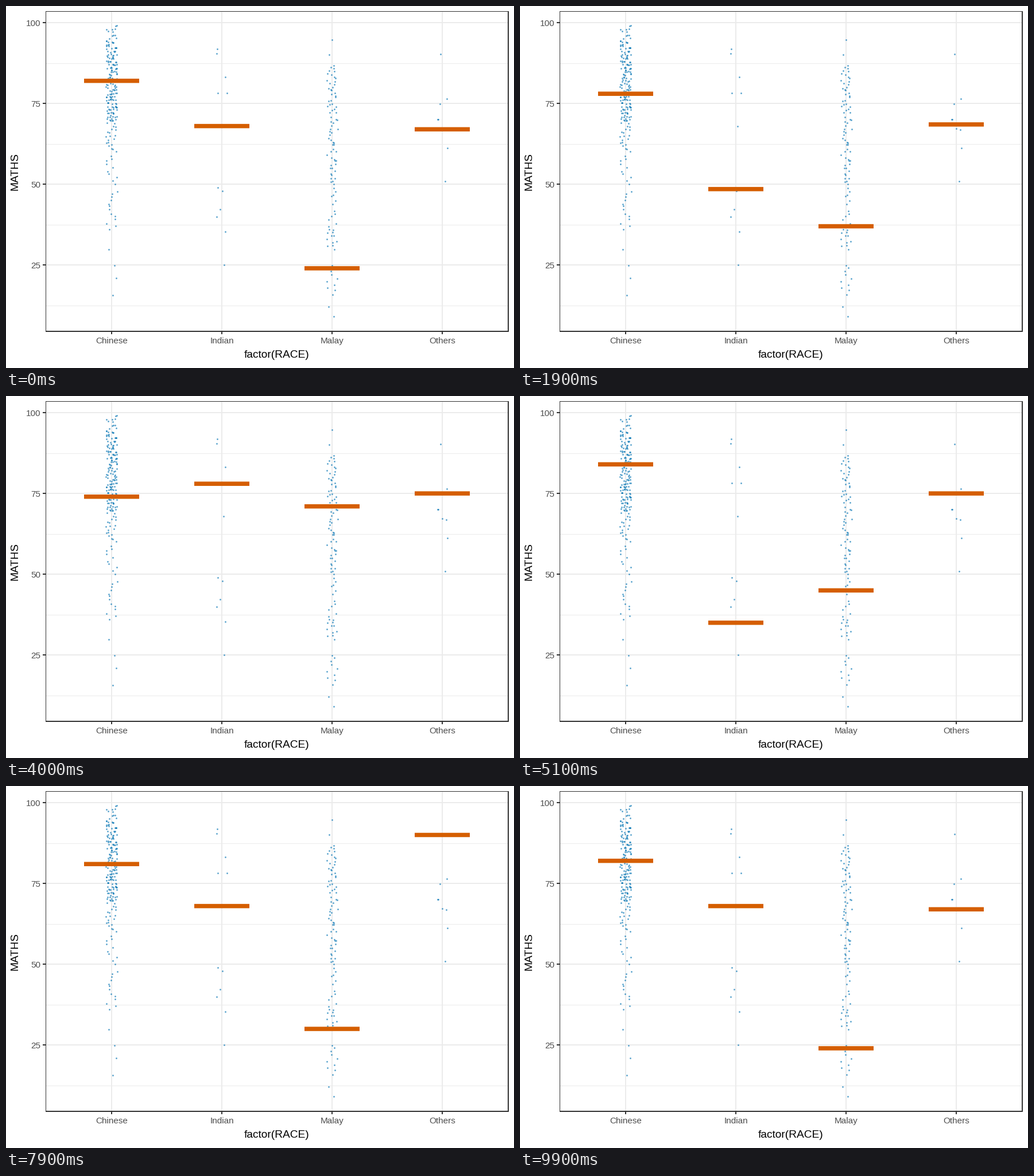
Animation, 885 px wide and 632 px high, one loop 10000 ms. Source, as a matplotlib script:

```python
import numpy as np
import matplotlib.pyplot as plt
from matplotlib.animation import FuncAnimation
from matplotlib.patches import Rectangle

W, H, DPI = 885, 632, 100
PX = 72 / DPI                       # points per pixel
FRAMES, INTERVAL = 100, 100
LEFT, TOP, RIGHT, BOTTOM = 69, 9, 876, 569
GROUPS = ["Chinese", "Indian", "Malay", "Others"]
BLUE, ORANGE = "#0072B2", "#D55E00"
GRID, DARK, GREY = "#EBEBEB", "#333333", "#4D4D4D"
BAR_W, BAR_H = 96, 7.5

# Sampled score of each group, state by state.
STATES = np.array([
    [82, 76, 67, 63, 83, 73, 78, 95, 91, 82, 74, 91, 80,
     84, 78, 89, 79, 66, 68, 72, 81, 76, 89, 78, 80],
    [68, 25, 78, 40, 48, 49, 40, 78, 40, 68, 78, 42, 68,
     35, 42, 68, 92, 25, 48, 49, 68, 25, 78, 68, 25],
    [24, 62, 87, 18, 58, 16, 61, 56, 60, 63, 71, 58, 58,
     45, 60, 58, 25, 32, 24, 58, 30, 58, 70, 63, 58],
    [67, 90, 67, 51, 70, 67, 75, 70, 75, 67, 75, 70, 67,
     75, 67, 70, 76, 70, 67, 76, 90, 70, 70, 67, 90]], float).T

# Small groups: pixel offsets from the group centre, and scores.
SMALL = {
    1: ([-8, -9, 6, -7, 9, 3, -7, 1, -3, -9, 6, 4],
        [91.9, 90.4, 83.2, 78.3, 78.2, 68, 48.9, 47.9, 42.3, 39.9, 35.3, 25]),
    3: ([-3, 8, -4, -8, -7, 0, 7, 9, 5],
        [90.2, 76.4, 74.9, 70.1, 70.1, 67.3, 66.9, 61.2, 51]),
}

# Large groups: ranks and the scores reached there.
LARGE = {
    0: ([0, 3, 4, 28, 47, 78, 112, 136, 169, 196, 208],
        [16, 30, 36, 61, 69.5, 74.5, 79.5, 84.5, 89.5, 94.5, 99]),
    2: ([0, 2, 11, 12, 24, 36, 51, 61, 78, 89, 103, 104, 105],
        [9, 16, 25, 30, 37, 50, 58.5, 64.5, 74.5, 79.5, 87, 90, 95]),
}


def x_of(group):
    return 184 + 192 * group


def y_of(score):
    return 29.05 + (100 - score) * 5.643


def rect(x0, y0, x1, y1, color, z, snap=True):
    patch = Rectangle((x0, y0), x1 - x0, y1 - y0, fc=color, lw=0, zorder=z,
                      snap=snap)
    return ax.add_patch(patch)


def label(x, y, text, size, color, **kw):
    ax.text(x, y, text, fontsize=size * PX, color=color,
            family="Liberation Sans", **kw)


def scatter_points():
    rng = np.random.default_rng(7)
    points = []
    for g, (dx, scores) in SMALL.items():
        points += zip(x_of(g) + np.array(dx), y_of(np.array(scores)))
    for g, (ranks, scores) in LARGE.items():
        n = ranks[-1] + 1
        whole = np.round(np.interp(np.arange(n), ranks, scores))
        dx = rng.uniform(-9.6, 9.6, n)
        points += zip(x_of(g) + dx, y_of(whole + rng.uniform(-0.3, 0.3, n)))
    return np.array(points)


def draw_panel():
    for v in (12.5, 37.5, 62.5, 87.5):
        y = round(y_of(v))
        rect(LEFT, y, RIGHT, y + 1, GRID, 1)
    for v in (25, 50, 75, 100):
        y = round(y_of(v))
        rect(LEFT, y - 1, RIGHT, y + 1, GRID, 1)
        rect(64, y - 1, LEFT, y + 1, DARK, 1)
        label(60.3, y + 6, str(v), 15.2, GREY, ha="right", va="baseline")
    for g, name in enumerate(GROUPS):
        x = x_of(g)
        rect(x - 1, TOP, x + 1, BOTTOM, GRID, 1)
        rect(x - 1, BOTTOM, x + 1, 573, DARK, 1)
        label(x, 589, name, 15.2, GREY, ha="center", va="baseline")
    rect(LEFT, TOP, LEFT + 1, BOTTOM, DARK, 5)
    rect(LEFT, TOP, RIGHT, TOP + 1, DARK, 5)
    rect(RIGHT - 2, TOP, RIGHT, BOTTOM, DARK, 5)
    rect(LEFT, BOTTOM - 2, RIGHT, BOTTOM, DARK, 5)
    label(472, 614, "factor(RACE)", 19.1, "black", ha="center", va="baseline")
    label(24.5, 288.6, "MATHS", 19.1, "black", ha="right", va="center",
          rotation=90)


def scores_at(frame):
    """Three frames of rest, then one halfway step; one rest is a frame short."""
    step = frame + (frame >= 50)
    state, phase = divmod(step, 4)
    now = STATES[state % len(STATES)]
    following = STATES[(state + 1) % len(STATES)]
    return (now + following) / 2 if phase == 3 else now


def update(frame):
    for bar, score in zip(bars, scores_at(frame)):
        bar.set_y(y_of(score) - BAR_H / 2)
    return bars


fig = plt.figure(figsize=(W / DPI, H / DPI), dpi=DPI, facecolor="white")
ax = fig.add_axes([0, 0, 1, 1])
ax.set(xlim=(0, W), ylim=(H, 0))
ax.axis("off")

draw_panel()
px, py = scatter_points().T
ax.scatter(px, py, s=(2.9 * PX) ** 2, c=BLUE, alpha=0.62, lw=0, zorder=3)
bars = [rect(x_of(g) - BAR_W / 2, 0, x_of(g) + BAR_W / 2, BAR_H, ORANGE, 4,
             snap=False) for g in range(len(GROUPS))]

anim = FuncAnimation(fig, update, frames=FRAMES, interval=INTERVAL,
                     repeat=True, repeat_delay=0, blit=False)
plt.show()
```
